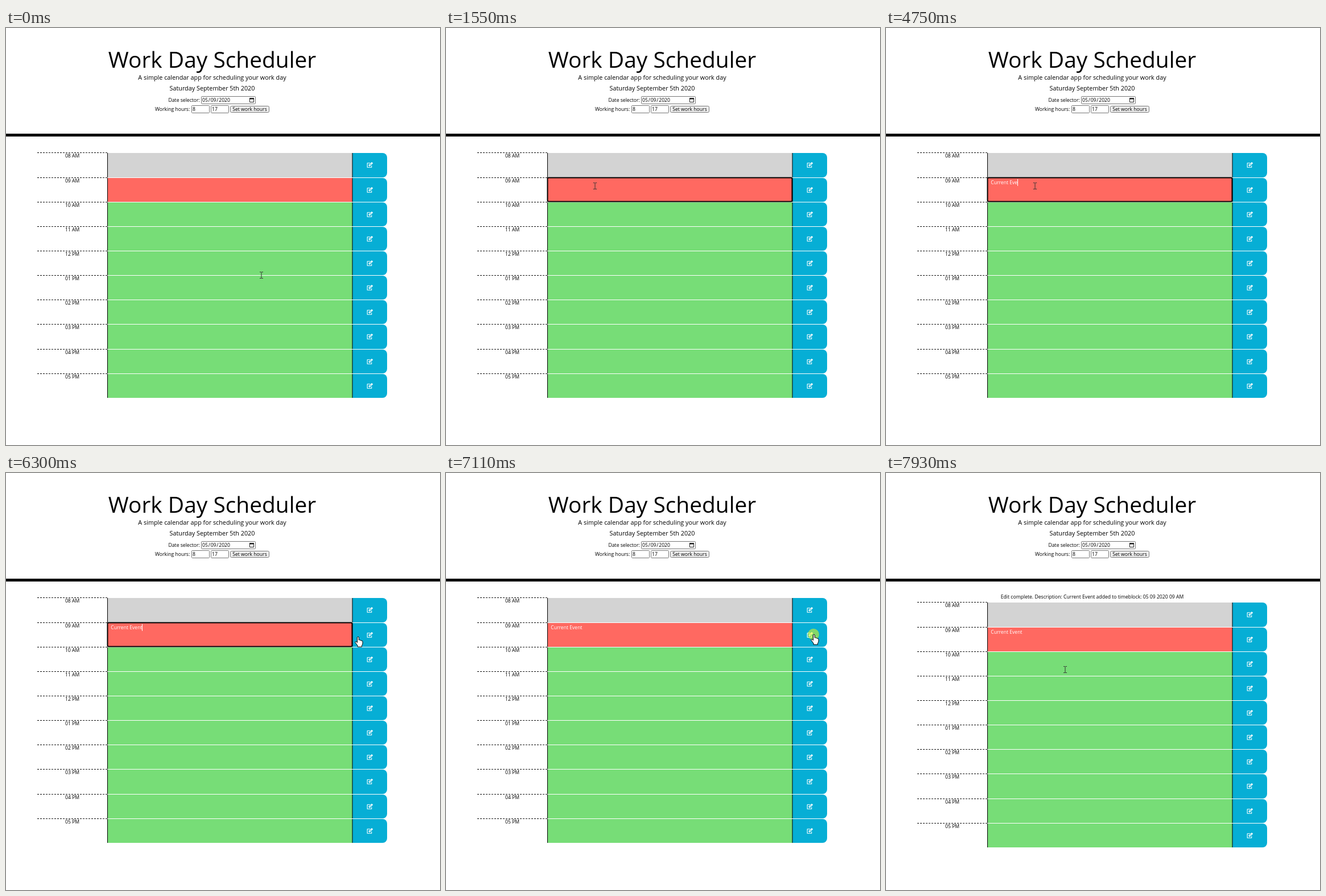
Recreate the animation shown at these times as an HTML page with a canvas. Size 763 by 734 pixels, loop 8000 ms.

```html
<!DOCTYPE html>
<html lang="en">
<head>
<meta charset="utf-8">
<title>Work Day Scheduler</title>
<style>
  html, body { margin: 0; width: 100%; height: 100%; overflow: hidden; background: #fff; }
  canvas { display: block; }
</style>
</head>
<body>
<canvas id="stage" width="763" height="734"></canvas>
<script>
const ctx = document.getElementById('stage').getContext('2d');
const LOOP = 8000;
const BASE = 8.64, LEAD = BASE * 1.25, TITLE = BASE * 4.5;
const CENTER = 362.5;
const BLUE = '#06aed5';
const FIRST_HOUR = 8, ROWS = 10, ROW_START = 219.85, ROW_PITCH = 43.15;
const FOCUS = 1010, BLUR = 7015, SAVED = 7180;
const BLINK = 540, KEY_GAP = 196;

const BURSTS = [
  { at: 2330, chars: 'Current' },
  { at: 3890, chars: ' ' },
  { at: 4290, chars: 'Event' }
];
const ENTRY = BURSTS.map(b => b.chars).join('');

// Each move eases out along a quadratic curve from the previous resting point.
const REST = [449, 435];
const MOVES = [
  { start: 30, end: 450, bend: [340, 310], to: [270, 251] },
  { start: 600, end: 1010, bend: [264, 258], to: [262, 278] },
  { start: 5840, end: 6300, bend: [400, 225], to: [619, 288] },
  { start: 6300, end: 6600, bend: [655, 290], to: [691, 287] },
  { start: 6690, end: 6980, bend: [669, 286], to: [647, 284] },
  { start: 7300, end: 7930, bend: [470, 365], to: [315, 346] }
];
const CLICKS = [
  { start: FOCUS, end: 1150, x: 260, y: 277 },
  { start: BLUR, end: SAVED, x: 646, y: 284 }
];

const HAND = new Path2D('M-1.5 1Q0 -.8 1.2 1V6Q2.6 5 3.7 6.6Q5 5.8 6 7.4Q8 6.8 8 8.8V12Q8 14 6.5 15.5V18H-.8V16L-5 10.3Q-5.5 8.4 -3.6 8.6L-1.5 10.4Z');
const ARROW = new Path2D('M0 0V15.5L3.5 12.2L6 17.5L8.3 16.4L5.9 11.3H11Z');

function text(str, x, y, size = BASE, color = '#000', align = 'left') {
  ctx.font = `${size}px "Open Sans", sans-serif`;
  ctx.textAlign = align;
  ctx.fillStyle = color;
  ctx.fillText(str, x, y);
  return ctx.measureText(str).width;
}

function centered(str, y, size, x = CENTER) {
  text(str, x, y, size, '#000', 'center');
}

function rect(x, y, w, h, color) {
  ctx.fillStyle = color;
  ctx.fillRect(x, y, w, h);
}

function box(x, y, w, h, fill, stroke, radius = 0, lineWidth = 1) {
  ctx.beginPath();
  ctx.roundRect(x, y, w, h, radius);
  if (fill) { ctx.fillStyle = fill; ctx.fill(); }
  if (stroke) { ctx.strokeStyle = stroke; ctx.lineWidth = lineWidth; ctx.stroke(); }
}

function line(points, color, width) {
  ctx.beginPath();
  points.forEach(([x, y]) => ctx.lineTo(x, y));
  ctx.strokeStyle = color;
  ctx.lineWidth = width;
  ctx.stroke();
}

function drawDate(x, y) {
  const fieldPad = .8;
  for (const part of ['05', '/', '09', '/', '2020']) {
    const pad = part === '/' ? 0 : fieldPad;
    x += text(part, x + pad, y) + 2 * pad;
  }
}

function drawHeader() {
  centered('Work Day Scheduler', 70, TITLE);
  centered('A simple calendar app for scheduling your work day', 91, LEAD);
  centered('Saturday September 5th 2020', 110.3, LEAD);

  text('Date selector:', 285.5, 130.3);
  box(343.5, 120.5, 95, 13, '#fff', '#767676', 1);
  drawDate(344.2, 130.3);
  box(428.5, 123.5, 7, 7, null, '#222');
  rect(428, 123, 8, 2.5, '#222');

  text('Working hours:', 262, 145.7);
  box(326.5, 136.5, 31, 13, '#fff', '#767676', 1);
  text('8', 328, 145.7);
  box(360.5, 136.5, 31, 13, '#fff', '#767676', 1);
  text('17', 362, 145.7);
  box(394.5, 137.5, 68, 11, '#efefef', '#767676', 2);
  centered('Set work hours', 145.7, BASE, 428.5);

  rect(0, 186, 763, 5, '#000');
}

function drawEditIcon(x, y) {
  ctx.save();
  ctx.translate(x, y);
  ctx.lineJoin = 'round';
  line([[.5, -3.3], [-4.5, -3.3], [-4.5, 4.3], [3, 4.3], [3, 1.2]], '#fff', 1.1);
  line([[-1.5, 1.7], [4.4, -4]], '#fff', 3.1);
  line([[-.4, .6], [2.6, -2.3]], BLUE, 1);
  ctx.restore();
}

function rowTop(i) {
  return Math.floor(ROW_START + ROW_PITCH * i);
}

function hourLabel(hour) {
  const twelve = (hour + 11) % 12 + 1;
  return `${String(twelve).padStart(2, '0')} ${hour < 12 ? 'AM' : 'PM'}`;
}

function drawRow(i) {
  const top = rowTop(i);
  const height = rowTop(i + 1) - top - 1;
  const color = i === 0 ? '#d3d3d3' : i === 1 ? '#ff6961' : '#77dd77';
  centered(hourLabel(FIRST_HOUR + i), top + 8.5, BASE, 116.6);
  ctx.setLineDash([3, 2]);
  line([[55, top + .5], [178, top + .5]], '#000', 1);
  ctx.setLineDash([]);
  rect(178, top + 1, 431, height, color);
  rect(178, top + 1, 1, height, '#000');
  box(609, top + 1, 61, height, BLUE, null, [0, 8, 8, 0]);
  rect(608.5, top + 1, 1, height, '#000');
  drawEditIcon(639.7, top + 22);
}

function drawEntry(t) {
  const left = 184.2;
  let shown = '', lastInput = FOCUS;
  for (const { at, chars } of BURSTS) {
    if (t < at) break;
    const count = Math.min(chars.length, Math.floor((t - at) / KEY_GAP) + 1);
    shown += chars.slice(0, count);
    lastInput = at + (count - 1) * KEY_GAP;
  }
  const width = text(shown, left, 275.2, BASE, '#fff');
  if (t < FOCUS || t >= BLUR) return;
  box(178.5, 263.5, 430, 42, null, '#000', 2, 2);
  if (Math.floor((t - lastInput) / BLINK) % 2 === 0) {
    rect(Math.floor(left + width), 266, 1, 12, '#fff');
  }
}

function pointerAt(t) {
  let pos = REST;
  for (const { start, end, bend, to } of MOVES) {
    if (t < start) break;
    const p = Math.min(1, (t - start) / (end - start));
    const u = 1 - (1 - p) ** 2;
    pos = pos.map((from, k) => (1 - u) ** 2 * from + 2 * u * (1 - u) * bend[k] + u * u * to[k]);
  }
  return pos.map(Math.round);
}

function drawBeam(x, y) {
  rect(x - .5, y - 5, 1, 11, '#333');
  for (const edge of [y - 6, y + 5]) {
    rect(x - 3, edge, 2.5, 1, '#333');
    rect(x + .5, edge, 2.5, 1, '#333');
  }
}

function drawShape(x, y, path) {
  ctx.save();
  ctx.translate(x, y);
  ctx.lineJoin = 'round';
  ctx.fillStyle = '#fff';
  ctx.strokeStyle = '#000';
  ctx.lineWidth = 1;
  ctx.fill(path);
  ctx.stroke(path);
  ctx.restore();
}

function drawPointer(t) {
  const [x, y] = pointerAt(t);
  if (x < 609) drawBeam(x, y);
  else drawShape(x, y, x < 670 ? HAND : ARROW);
}

function draw(t) {
  rect(0, 0, 763, 734, '#fff');
  drawHeader();

  ctx.save();
  if (t >= SAVED) {
    centered(`Edit complete. Description: ${ENTRY} added to timeblock: 05 09 2020 09 AM`, 220.7, BASE);
    ctx.translate(0, 8);
  }
  for (let i = 0; i < ROWS; i++) drawRow(i);
  drawEntry(t);
  ctx.restore();

  for (const { start, end, x, y } of CLICKS) {
    if (t >= start && t < end) box(x - 10, y - 10, 20, 20, 'rgba(255,255,0,.5)', null, 10);
  }
  drawPointer(t);
}

const begin = performance.now();
function tick() {
  draw((performance.now() - begin) % LOOP);
  requestAnimationFrame(tick);
}
tick();
</script>
</body>
</html>
```
